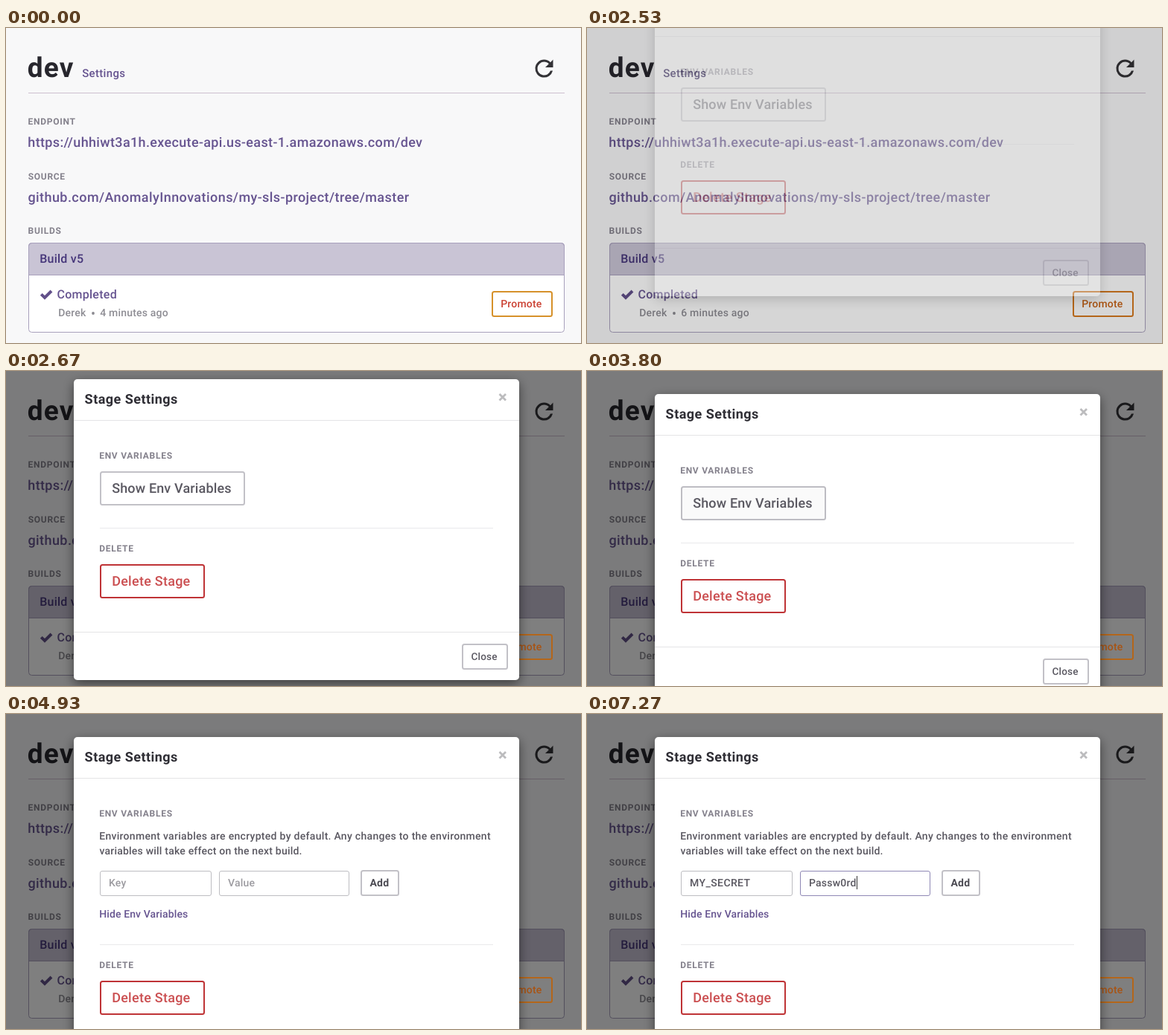
Animation of 772x424 px, one loop 8 s. Source, as an HTML page:

```html
<!DOCTYPE html>
<html lang="en">
<head>
<meta charset="utf-8">
<title>Stage settings</title>
<style>
  html, body { margin: 0; width: 100%; height: 100%; overflow: hidden; background: #f8f8f9; }
  svg { display: block; width: 772px; height: 424px; }
  text {
    font: 500 14px Roboto, "Open Sans", sans-serif;
    letter-spacing: .014em;
    text-rendering: geometricPrecision;
    white-space: pre;
  }
  .label { font-size: 12px; font-weight: 700; letter-spacing: .06em; fill: #84818c; }
  .link { fill: #665490; }
  .big { font-size: 18px; }
  .mid { font-size: 16px; }
  .muted { fill: #8e8d94; }
  .body { fill: #5a5861; }
  .hint { fill: #9c9ba0; }
  .box { fill: #fff; stroke-width: 2; stroke: #c2c1c7; }
  .field { fill: #fff; stroke: #bdbdc1; }
</style>
</head>
<body>
<svg viewBox="0 0 772 424">
  <defs>
    <filter id="shadow" x="-10%" y="-10%" width="120%" height="125%">
      <feDropShadow dx="0" dy="5" stdDeviation="7.5" flood-color="#000" flood-opacity=".5"/>
    </filter>
  </defs>

  <g id="page">
    <rect width="772" height="424" fill="#f8f8f9"/>
    <text x="28.8" y="66" style="font-size:37px;font-weight:700;letter-spacing:.03em" fill="#27262d">dev</text>
    <text id="settings" x="102.2" y="66" style="font-size:15px;letter-spacing:.022em">Settings</text>
    <path transform="translate(704.5 36.6) scale(1.5)" fill="#333236"
      d="M17.65 6.35A7.96 7.96 0 0 0 12 4a8 8 0 1 0 7.73 10h-2.08A6 6 0 1 1 12 6c1.66 0 3.14.69 4.22 1.78L13 11h7V4z"/>
    <path d="M30 87.5H750" stroke="#cdbfcf"/>

    <text class="label" x="29.5" y="130">ENDPOINT</text>
    <text class="link big" x="29.3" y="160" style="letter-spacing:.019em">https://uhhiwt3a1h.execute-api.us-east-1.amazonaws.com/dev</text>
    <text class="label" x="29.7" y="204">SOURCE</text>
    <text class="link big" x="29.4" y="234" style="letter-spacing:.024em">github.com/AnomalyInnovations/my-sls-project/tree/master</text>
    <text class="label" x="29.5" y="277">BUILDS</text>

    <rect x="30.5" y="289.5" width="719" height="120" rx="4" fill="#fff"/>
    <path d="M30.5 332.5V293.5a4 4 0 0 1 4-4H745.5a4 4 0 0 1 4 4V332.5z" fill="#c9c4d5" stroke="#a8a0bc"/>
    <rect x="30.5" y="289.5" width="719" height="120" rx="4" fill="none" stroke="#a8a0bc"/>
    <text class="mid" x="45.3" y="316" fill="#46367a">Build v5</text>
    <path d="M47.3 358.3L52 363L61 354" fill="none" stroke="#62508a" stroke-width="4"/>
    <text class="link mid" x="68.5" y="364" style="letter-spacing:.016em">Completed</text>
    <text class="muted" x="70.2" y="388">Derek</text>
    <circle cx="117" cy="384" r="1.9" fill="#89888f"/>
    <text id="age" class="muted" x="126.2" y="388"></text>
  </g>

  <rect id="backdrop" width="772" height="424"/>
  <g id="promote">
    <rect x="653" y="355" width="80" height="33" rx="2.5" fill="none" stroke-width="2"/>
    <text x="664.2" y="376">Promote</text>
  </g>

  <g id="modal">
    <rect id="panel" x="91" y="31" width="598" rx="5" fill="#fff" filter="url(#shadow)"/>
    <text class="big" x="105.6" y="64" style="font-weight:700;letter-spacing:.026em" fill="#2f2e35">Stage Settings</text>
    <path d="M662.5 51L671 59.5M671 51L662.5 59.5" stroke="#bcbcbe" stroke-width="2.8"/>
    <path d="M91 86.5H689" stroke="#e4e4e6"/>
    <text class="label" x="125.2" y="138">ENV VARIABLES</text>

    <g id="closed">
      <rect id="show" class="box" x="127" y="156" width="193" height="44" rx="2.5"/>
      <text class="big body" x="142.2" y="184" style="letter-spacing:.008em">Show Env Variables</text>
    </g>

    <g id="form">
      <text class="body" x="125.2" y="169" style="letter-spacing:.021em">Environment variables are encrypted by default. Any changes to the environment</text>
      <text class="body" x="125.5" y="189">variables will take effect on the next build.</text>
      <rect id="keyBox" class="field" x="126.5" y="211.5" width="149" height="33" rx="2.5"/>
      <text id="keyText" x="138" y="232"></text>
      <rect id="valueBox" class="field" x="286.5" y="211.5" width="174" height="33" rx="2.5"/>
      <text id="valueText" x="298" y="232"></text>
      <path id="caret" stroke="#333"/>
      <rect class="box" x="477" y="211" width="50" height="33" rx="2.5"/>
      <text x="488.5" y="232" style="font-weight:700" fill="#4b4a52">Add</text>
      <text class="link" x="125.2" y="274" style="letter-spacing:.008em">Hide Env Variables</text>
    </g>

    <g id="lower">
      <path d="M126 231.5H654" stroke="#e9e9eb"/>
      <text class="label" x="125.2" y="263">DELETE</text>
      <rect x="127" y="281" width="139" height="44" rx="2.5" fill="#fff" stroke="#bf3336" stroke-width="2"/>
      <text class="big" x="142.2" y="309" fill="#cb4f51">Delete Stage</text>
      <path d="M91 371.5H689" stroke="#e4e4e6"/>
      <rect class="box" x="613" y="388" width="60" height="33" rx="2.5"/>
      <text class="body" x="624.5" y="409" style="font-size:13.5px">Close</text>
    </g>
  </g>
</svg>

<script>
const LOOP = 8000, FPS = 15;
const OPEN = 2485, HOVER = 3735, PRESS = 4480, EXPAND = 4930;
const KEY_FOCUS = 5470, VALUE_FOCUS = 6330;
const MODAL_H = 405, FORM_GROWTH = 79;

const el = id => document.getElementById(id);
const set = (node, attrs) => {
  for (const name in attrs) node.setAttribute(name, attrs[name]);
};
const show = (id, on) => set(el(id), { visibility: on ? 'visible' : 'hidden' });
const ramp = (t, start, length) => Math.min(1, Math.max(0, (t - start) / length));
const mix = (a, b, p) => `rgb(${a.map((v, i) => Math.round(v + (b[i] - v) * p))})`;
const snap = t => Math.floor((t + 4) * FPS / 1000) * 1000 / FPS;

const CLEAR = [189, 189, 193], FOCUS = [143, 136, 181];

function drawPage(t) {
  const opened = t >= OPEN;
  const color = opened ? '#32255a' : t >= 1520 ? '#9486b3' : t >= 1060 ? '#7a6a9c' : '#665490';
  set(el('settings'), { fill: color });
  el('age').textContent = (opened ? 6 : 4) + ' minutes ago';

  const [box, label] = el('promote').children;
  set(box, { stroke: opened ? '#b4661a' : '#d6912a' });
  set(label, { fill: opened ? '#a85414' : '#cb4234' });
  set(el('backdrop'), { opacity: ramp(t, OPEN, 150) * .5 });
}

function drawModal(t) {
  const expanded = t >= EXPAND - 5;
  const slide = 1 - Math.pow(1 - ramp(t, OPEN, 300), 1.72);
  set(el('modal'), {
    opacity: ramp(t, OPEN, 150),
    transform: `translate(0 ${Math.round(-MODAL_H / 4 * (1 - slide))})`
  });
  const grow = expanded ? FORM_GROWTH : 0;
  set(el('panel'), { height: MODAL_H + grow });
  set(el('lower'), { transform: `translate(0 ${grow})` });
  show('closed', !expanded);
  show('form', expanded);

  const shade = ramp(t, HOVER, 300) + ramp(t, PRESS, 300) * .7;
  el('show').style.fill = mix([255, 255, 255], [231, 231, 234], shade);
  el('show').style.stroke = mix([194, 193, 199], [174, 173, 181], shade);
}

function drawField(name, hint, typed, focus) {
  const text = el(name + 'Text');
  text.textContent = typed || hint;
  text.setAttribute('class', typed ? 'body' : 'hint');
  text.style.letterSpacing = name === 'key' && typed ? '.03em' : '.014em';
  el(name + 'Box').style.stroke = mix(CLEAR, FOCUS, focus);
  return typed ? text.getComputedTextLength() : 0;
}

function drawForm(t) {
  const keyCount = t < 5595 ? 0 : Math.floor((t - 5595) / 75) + 1;
  const valueCount = t >= 7260 ? 8 : t >= 7195 ? 7
    : t < 6525 ? 0 : Math.min(5, Math.floor((t - 6525) / 135) + 1);
  const toValue = ramp(t, VALUE_FOCUS - 40, 150);
  const toKey = ramp(t, KEY_FOCUS - 40, 150) - toValue;
  const keyWidth = drawField('key', 'Key', 'MY_SECRET'.slice(0, keyCount), toKey);
  const valueWidth = drawField('value', 'Value', 'Passw0rd'.slice(0, valueCount), toValue);

  const x = t >= VALUE_FOCUS ? 298 + valueWidth : 138 + keyWidth;
  set(el('caret'), { d: `M${Math.round(x) + .5} 218V236` });
  show('caret', t >= KEY_FOCUS - 5);
}

let start;
function frame(now) {
  start ??= now;
  const t = snap((now - start) % LOOP);
  drawPage(t);
  drawModal(t);
  drawForm(t);
  requestAnimationFrame(frame);
}
frame(performance.now());
</script>
</body>
</html>
```
